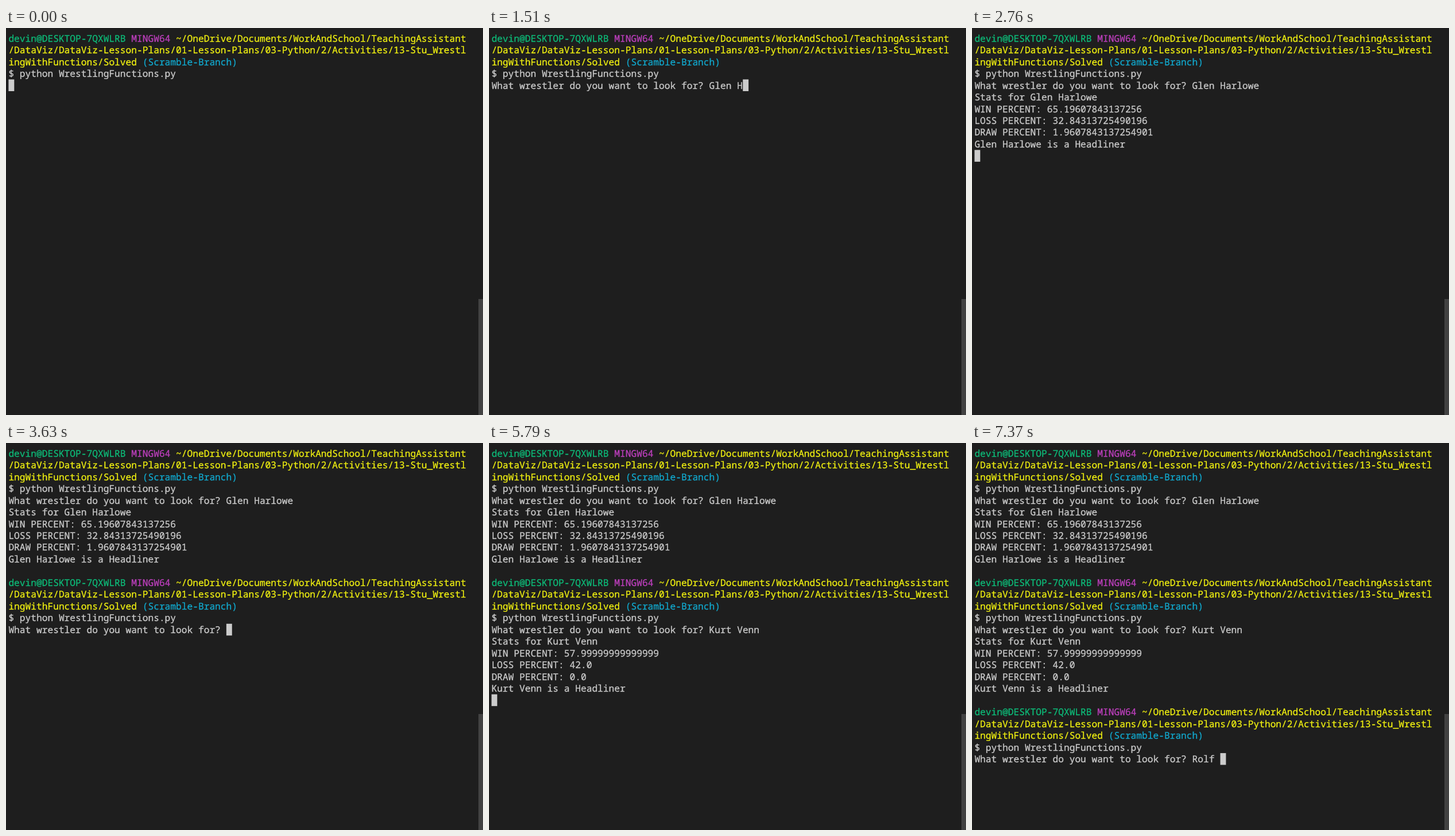
These frames come from a looping animation (831x674 px, 8 s). An HTML page:

```html
<!DOCTYPE html>
<html lang="en">
<head>
<meta charset="utf-8">
<title>Terminal session</title>
<style>
  html, body { margin: 0; width: 100%; height: 100%; overflow: hidden; background: #1e1e1e; }
  #screen {
    position: absolute; left: 4.4px; top: 7.6px; margin: 0; color: #ccc;
    font: 16.217px/20.48px "Noto Sans Mono", "DejaVu Sans Mono", monospace;
    font-kerning: none; font-variant-ligatures: none;
    text-rendering: geometricPrecision; white-space: pre;
    -webkit-text-stroke: .3px currentColor;
  }
  #cursor { position: absolute; left: 0; top: 0; }
  #cursor rect { fill: #ccc; }
  #slider { position: absolute; left: 823px; top: 472px; width: 8px; height: 202px; background: #424242; }
  .user { color: #0dbc79; }
  .sys { color: #bc3fbc; }
  .path { color: #f0f010; }
  .branch { color: #11a8cd; }
</style>
</head>
<body>
<pre id="screen"></pre>
<svg id="cursor" width="831" height="674"><rect width="9.9" height="20.48"/></svg>
<div id="slider"></div>
<script>
const LOOP = 8000, LEFT = 4.4, TOP = 7.6, CELL_W = 9.73, CELL_H = 20.48;
const screenEl = document.getElementById('screen');
const cursorEl = document.querySelector('#cursor rect');

const tint = (cls, s) => `<span class="${cls}">${s}</span>`;
const prompt = [
  tint('user', 'devin@DESKTOP-7QXWLRB') + ' ' + tint('sys', 'MINGW64') + ' ' +
    tint('path', '~/OneDrive/Documents/WorkAndSchool/TeachingAssistant'),
  tint('path', '/DataViz/DataViz-Lesson-Plans/01-Lesson-Plans/03-Python/2/Activities/13-Stu_Wrestl'),
  tint('path', 'ingWithFunctions/Solved') + ' ' + tint('branch', '(Scramble-Branch)'),
  '$ python WrestlingFunctions.py'
].join('\n');
const ask = 'What wrestler do you want to look for? ';
const stats = (name, win, loss, draw) =>
  `Stats for ${name}\nWIN PERCENT: ${win}\nLOSS PERCENT: ${loss}\n` +
  `DRAW PERCENT: ${draw}\n${name} is a Headliner\n`;

// Each step appends output at its time in ms.
const steps = [
  [0, prompt + '\n'], [150, ask],
  [530, 'G'], [705, 'le'], [880, 'n'], [1190, ' '],
  [1510, 'H'], [1660, 'a'], [1797, 'r'], [1935, 'l'], [2072, 'o'], [2210, 'w'], [2560, 'e'],
  [2660, '\n'],
  [2760, stats('Glen Harlowe', '65.19607843137256', '32.84313725490196', '1.9607843137254901')],
  [2910, '\n' + prompt], [3310, '\n'], [3630, ask],
  [3860, 'K'], [3997, 'u'], [4135, 'r'], [4272, 't'], [4410, ' '],
  [4780, 'V'], [4900, 'e'], [5020, 'n'], [5410, 'n'],
  [5790, '\n' + stats('Kurt Venn', '57.99999999999999', '42.0', '0.0')],
  [5880, '\n' + prompt], [6190, '\n'], [6440, ask],
  [6680, 'R'], [6860, 'o'], [7040, 'l'], [7220, 'f'], [7370, ' ']
];

let shown = 0;

function render(time) {
  const count = steps.filter(([at]) => at <= time).length;
  if (count === shown) return;
  shown = count;
  screenEl.innerHTML = steps.slice(0, count).map(([, s]) => s).join('');
  const lines = screenEl.textContent.split('\n');
  cursorEl.setAttribute('x', LEFT + lines[lines.length - 1].length * CELL_W);
  cursorEl.setAttribute('y', TOP + (lines.length - 1) * CELL_H);
}

const start = performance.now();
function tick() {
  render((performance.now() - start) % LOOP);
  requestAnimationFrame(tick);
}
tick();
</script>
</body>
</html>
```
